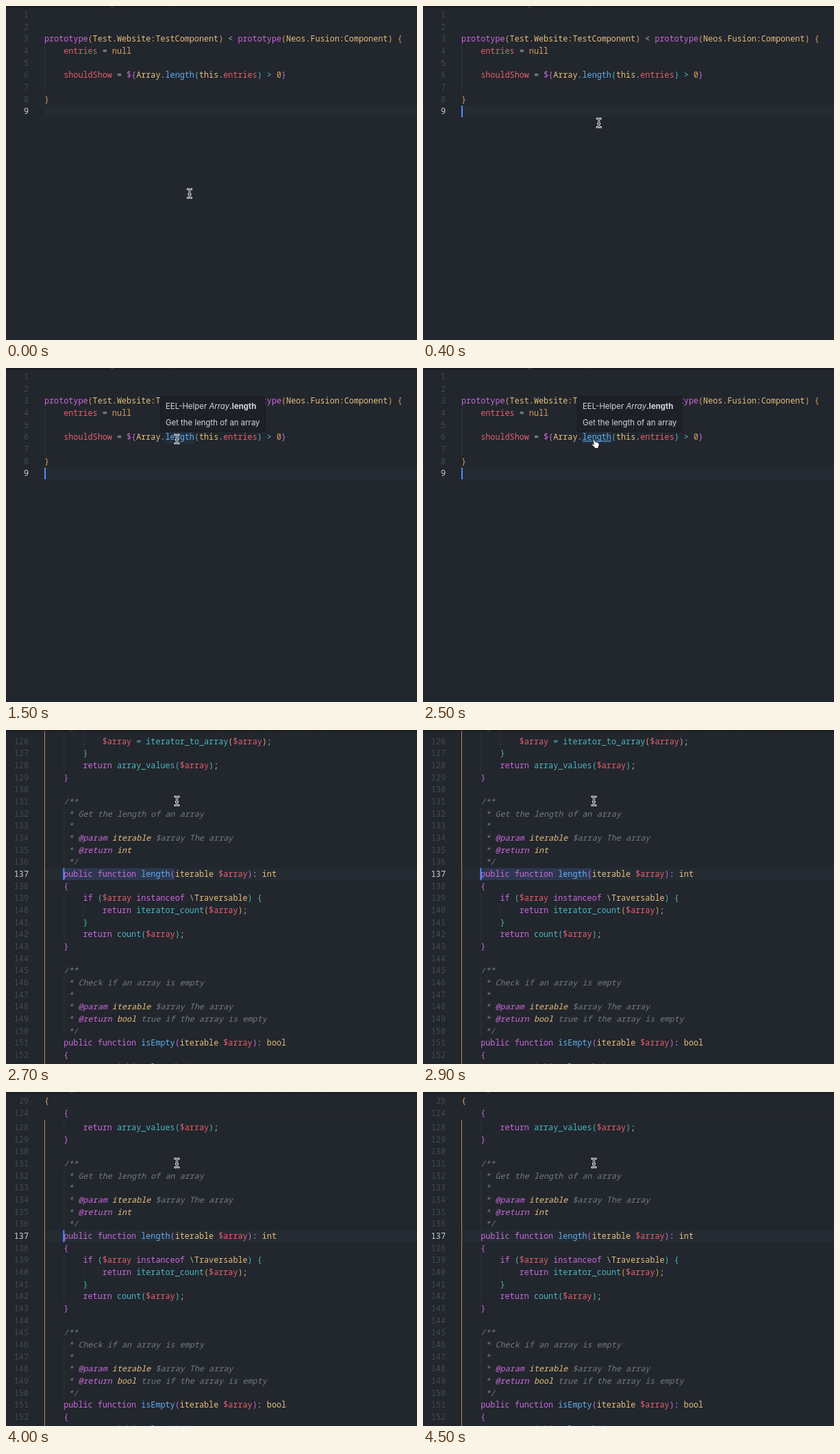
Write an HTML page that moves like this. It is 600 px wide and 489 px high and loops after 4.6 s.

```html
<!DOCTYPE html>
<html lang="en">
<head>
<meta charset="utf-8">
<title>Jump to definition</title>
<style>
  html, body { margin: 0; width: 100%; height: 100%; overflow: hidden; background: #22262d; }
  svg { display: block; width: 600px; height: 489px; }
  text { white-space: pre; }
  .code { font: 11.77px "Noto Sans Mono", "DejaVu Sans Mono", monospace; }
  .tip, .crumb { font: 11.4px Inter, "Open Sans", sans-serif; fill: #d3d6dc; }
  .crumb { fill: #6c727d; }
</style>
</head>
<body>
<svg id="stage" viewBox="0 0 600 489" xmlns="http://www.w3.org/2000/svg">
  <defs>
    <linearGradient id="shade" x2="0" y2="1">
      <stop offset="0" stop-color="#14161a" stop-opacity=".65"/>
      <stop offset="1" stop-color="#14161a" stop-opacity="0"/>
    </linearGradient>
    <path id="beamShape" d="M-2.8-6.3H-1.4L0-5L1.4-6.3H2.8M0-5V5M-2.8 6.3H-1.4L0 5L1.4 6.3H2.8M-1.2 1.2H1.2"/>
  </defs>
  <rect width="600" height="489" fill="#22262d"/>
  <g id="fusion" class="code"></g>
  <g id="php" class="code"></g>
  <rect width="600" height="4" fill="url(#shade)"/>
  <g id="tooltip" class="tip">
    <rect x="225.5" y="42" width="152.5" height="51" rx="2" fill="#1d2025" stroke="#181b1f"/>
    <text x="233" y="59.5">EEL-Helper <tspan font-style="italic">Array</tspan><tspan font-weight="700">.length</tspan></text>
    <text x="233" y="84">Get the length of an array</text>
  </g>
  <g id="beam" fill="none" stroke-linejoin="round">
    <use href="#beamShape" stroke="#eef0f2" stroke-width="2.8" stroke-linecap="round"/>
    <use href="#beamShape" stroke="#17191d"/>
  </g>
  <path id="hand" transform="translate(246 103.5)" fill="#fff" stroke="#111" stroke-width=".9" stroke-linejoin="round"
    d="M2.2 1.4Q3.4 0 4.3 1.5L5.4 5Q6.7 4.1 7.3 5.3Q8.7 4.6 9.2 6Q10.7 5.6 11 7.2Q11.6 10.2 10 12.2V14H4.5V12.7L.5 9.2Q-.5 7.7 1.2 7.5L3.2 8.7Z"/>
</svg>
<script>
const LOOP = 4600, STEP = 100, CHAR = 7.062, ROW = 17.67, LEFT = 56;
const $ = id => document.getElementById(id);

const COLORS = {
  p: '#cb69dc', y: '#e5c07b', r: '#e45f6e', b: '#61afef', c: '#4ab8c2',
  o: '#d8a05e', g: '#abb2bf', m: '#747a85', P: '#cb69dc', Y: '#e5c07b'
};
const ITALIC = 'mPY';

function add(parent, tag, attrs, content = '') {
  const node = document.createElementNS('http://www.w3.org/2000/svg', tag);
  for (const key in attrs) node.setAttribute(key, attrs[key]);
  node.textContent = content;
  return parent.appendChild(node);
}

const rect = (parent, x, y, width, height, fill) =>
  add(parent, 'rect', { x, y, width, height, fill });

// A row is an indent followed by color~text pairs.
function drawRow(parent, number, y, indent, source, active) {
  add(parent, 'text', { x: 33, y, 'text-anchor': 'end', fill: active ? '#ccd1da' : '#434955' }, number);
  if (!source) return;
  const line = add(parent, 'text', { y });
  const parts = source.split('~');
  let column = indent;
  for (let i = 0; i < parts.length; i += 2) {
    const [kind, text] = [parts[i], parts[i + 1]];
    add(line, 'tspan', {
      x: LEFT + column * CHAR, fill: COLORS[kind],
      'font-style': ITALIC.includes(kind) ? 'italic' : 'normal'
    }, text);
    column += text.length;
  }
}

const fusionRows = [
  [0], [0],
  [0, 'p~prototype~o~(~y~Test.Website:TestComponent~o~)~g~ < ~p~prototype~o~(~y~Neos.Fusion:Component~o~)~o~ {'],
  [4, 'r~entries~g~ = ~o~null'],
  [0],
  [4, 'r~shouldShow~g~ = ~p~${~y~Array~g~.~b~length~c~(~y~this~g~.~r~entries~c~)~c~ > ~o~0~p~}'],
  [0],
  [0, 'o~}'],
  [0]
];

const signature = (name, type) =>
  [4, `p~public function ~b~${name}~p~(~y~iterable ~r~$array~p~)~g~: ~y~${type}`];
const call = (name, bracket) => `p~return ~c~${name}~${bracket}~(~r~$array~${bracket}~)~g~;`;
const docBlock = (summary, type, note) => [
  [4, 'm~/**'],
  [5, 'm~* ' + summary],
  [5, 'm~*'],
  [5, 'm~* ~P~@param ~Y~iterable ~m~$array The array'],
  [5, `m~* ~P~@return ~Y~${type}~m~${note}`],
  [5, 'm~*/']
];

const phpRows = [
  [12, 'r~$array~c~ = ~c~iterator_to_array~o~(~r~$array~o~)~g~;'],
  [8, 'c~}'],
  [8, call('array_values', 'c')],
  [4, 'p~}'],
  [0],
  ...docBlock('Get the length of an array', 'int', ''),
  signature('length', 'int'),
  [4, 'p~{'],
  [8, 'p~if ~c~(~r~$array~p~ instanceof ~g~\\~y~Traversable~c~) {'],
  [12, call('iterator_count', 'o')],
  [8, 'c~}'],
  [8, call('count', 'c')],
  [4, 'p~}'],
  [0],
  ...docBlock('Check if an array is empty', 'bool', ' true if the array is empty'),
  signature('isEmpty', 'bool'),
  [4, 'p~{'],
  [8, 'p~return ~r~$this~c~->~b~length~c~(~r~$array~c~)~c~ === ~o~0~g~;']
];

const GUIDE = '#30353e', CARET = '#528bff', ACTIVE_ROW = '#242b33';

function buildFusion() {
  const view = $('fusion');
  rect(view, LEFT, 145.5, 544, 17.7, ACTIVE_ROW);
  rect(view, LEFT, 57, 1, 71, GUIDE);
  const hover = rect(view, 232.5, 93, 42.5, 17.5, '#23303d');
  fusionRows.forEach(([indent, source], i) =>
    drawRow(view, i + 1, 17 + i * ROW, indent, source, i === 8));
  const underline = rect(view, 232.5, 106.5, 42.4, 1, COLORS.b);
  const caret = rect(view, LEFT, 146, 2, 17, CARET);
  [[152, 'g'], [244, 'p']].forEach(([x, text]) => add(view, 'text', { x, y: -1.5, class: 'crumb' }, text));
  return { hover, underline, caret };
}

function buildPhp() {
  const view = $('php'), top = 20.7, first = 126;
  const rowTop = n => top + (n - first) * ROW - 12.8;
  const guide = (column, from, to) =>
    rect(view, LEFT + column * CHAR, rowTop(from), 1, (to - from + 1) * ROW, GUIDE);

  rect(view, LEFT, rowTop(137), 544, 17.7, ACTIVE_ROW);
  const range = rect(view, 84, rowTop(137), 162, 17.7, '#2c3850');
  guide(4, 125, 128);
  guide(4, 132, 136);
  guide(4, 139, 142);
  guide(4, 146, 150);
  guide(4, 153, 153);
  guide(8, 125, 126);
  guide(8, 140, 140);
  rect(view, LEFT, 0, 1, 489, '#b98a60');
  phpRows.forEach(([indent, source], i) =>
    drawRow(view, first + i, top + i * ROW, indent, source, first + i === 137));
  const caret = rect(view, 83.3, rowTop(137), 2, 17.5, CARET);

  const sticky = add(view, 'g', {});
  rect(sticky, 0, 0, 600, 40.5, '#22262d');
  drawRow(sticky, 29, 17, 0, 'o~{');
  drawRow(sticky, 124, 17 + ROW, 4, 'p~{');
  [[92, 'g'], [308, 'y'], [355, 'p'], [376, 'y'], [410, 'p'], [429, 'y'], [440, 'p'], [460, 'p']]
    .forEach(([x, text]) => add(view, 'text', { x, y: -1.5, class: 'crumb' }, text));
  return { range, caret, sticky };
}

const fusion = buildFusion(), php = buildPhp();
const show = (node, on) => node.setAttribute('display', on ? 'inline' : 'none');
const clamp = v => Math.max(0, Math.min(1, v));
const smooth = v => v * v * (3 - 2 * v);

const TIP = 1200, LINK = 2300, JUMP = 2700, RANGE_END = 3100, STICKY = 4000;

function render(t) {
  const jumped = t >= JUMP, linked = t >= LINK && !jumped;
  show($('fusion'), !jumped);
  show($('php'), jumped);

  show(fusion.caret, (t + 900) % 1000 < 500);
  show(fusion.hover, t >= TIP);
  show(fusion.underline, linked);
  show($('tooltip'), t >= TIP && !jumped);
  $('tooltip').setAttribute('opacity', clamp((t - TIP + STEP) / (2 * STEP)));

  show(php.caret, (t - JUMP) % 1000 < 500);
  show(php.range, t < RANGE_END);
  show(php.sticky, t >= STICKY);

  const move = smooth(clamp(t / 700));
  $('beam').setAttribute('transform', `translate(${268 - 18.5 * move} ${274.5 - 170.5 * move})`);
  show($('beam'), !linked);
  show($('hand'), linked);
}

const start = performance.now();
function tick() {
  const t = (performance.now() - start) % LOOP;
  render(Math.floor(t / STEP) * STEP);
  requestAnimationFrame(tick);
}
tick();
</script>
</body>
</html>
```
